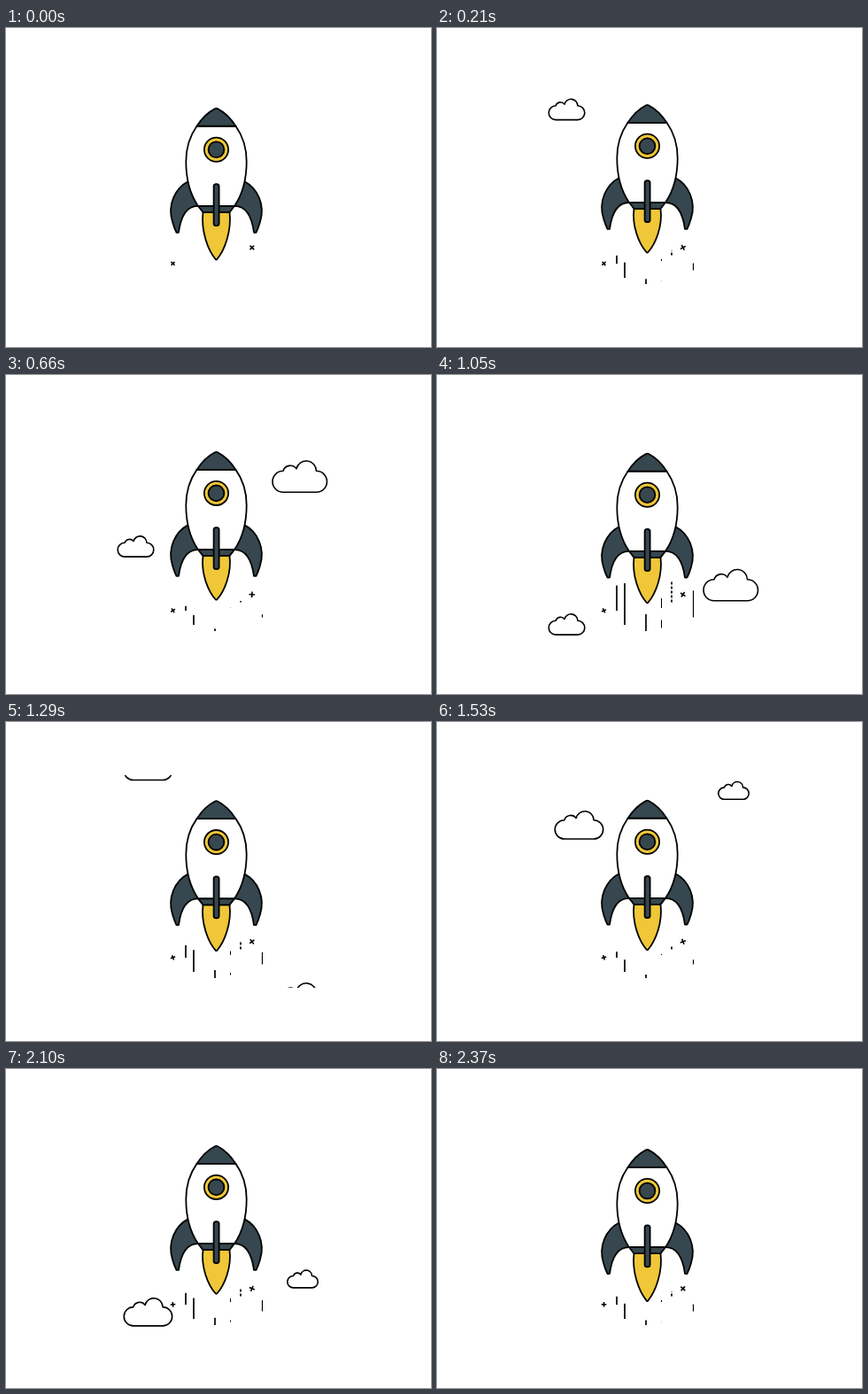
An HTML page with a canvas that plays this animation: 480 px wide and 360 px high, repeating every 2400 ms.

```html
<!DOCTYPE html>
<html lang="en">
<head>
<meta charset="utf-8">
<title>Rocket</title>
<style>
  html, body { margin: 0; width: 100%; height: 100%; overflow: hidden; background: #fff; }
  canvas { display: block; width: 480px; height: 360px; }
</style>
</head>
<body>
<canvas id="stage" width="480" height="360"></canvas>
<script>
const ctx = document.getElementById('stage').getContext('2d');
const LOOP = 2400, STEP = 30, TAU = Math.PI * 2;
const INK = '#000', DARK = '#37474f', YELLOW = '#efc738', WHITE = '#fff';

const fin = new Path2D('M205.5 173.5C191 181 182 200 188 219Q190 226 192.5 231H195Q199 201 217 201.2Z');
const body = new Path2D('M215.5 111C207 123 203.3 137 203.3 151C203.3 170 208 188 217 201.2H258C267 188 271.7 170 271.7 151C271.7 137 268 123 259.5 111Z');
const nose = new Path2D('M215.5 111C221 102.5 228 95.5 236 91.4Q237.5 90.6 239 91.4C247 95.5 254 102.5 259.5 111Z');
const nozzle = new Path2D('M217 201.2H258L252.5 208.2H222.5Z');
const flame = new Path2D('M222.5 0C220 21 228 43 236.8 53.4Q237.5 54.2 238.2 53.4C247 43 255 21 252.5 0Z');
const cloudShape = new Path2D('M12 35.5A12 12 0 0 1 12 11.5A8.5 8.5 0 0 1 27 9A11.4 11.4 0 0 1 49.5 11.5A12 12 0 0 1 49.5 35.5Z');

// base: bottom edge at time "at"; speed in px per ms
const clouds = [
  { x: 126.2, scale: 0.66, base: 151, at: 420, speed: 0.2256 },
  { x: 301, scale: 1, base: 132.3, at: 660, speed: 0.314 },
  { x: 133.2, scale: 0.886, base: 132, at: 1530, speed: 0.277 },
  { x: 317.8, scale: 0.56, base: 87.3, at: 1530, speed: 0.28 }
];

// length = gain * stretch - cut, growing upwards from the bottom
const trails = [
  { x: 203, bottom: 266, gain: 0.65, cut: 2, width: 1.7 },
  { x: 212, bottom: 282, gain: 1, cut: 0, width: 1.7 },
  { x: 236, bottom: 289, gain: 0.45, cut: 2.2, width: 1.7 },
  { x: 253.5, bottom: 263, gain: 0.3, cut: 3, width: 1 },
  { x: 253.5, bottom: 285.5, gain: 0.3, cut: 5, width: 1 },
  { x: 265, bottom: 256.5, gain: 0.6, cut: 5, width: 1.7, dash: [3, 2] },
  { x: 289.5, bottom: 273.5, gain: 0.75, cut: 5, width: 1.2 }
];

function shape(path, fill, width = 1.8) {
  ctx.fillStyle = fill;
  ctx.strokeStyle = INK;
  ctx.lineWidth = width;
  ctx.fill(path);
  ctx.stroke(path);
}

function disc(x, y, r, fill) {
  const path = new Path2D();
  path.arc(x, y, r, 0, TAU);
  shape(path, fill);
}

function line(x1, y1, x2, y2) {
  ctx.beginPath();
  ctx.moveTo(x1, y1);
  ctx.lineTo(x2, y2);
  ctx.stroke();
}

function drawClouds(t) {
  ctx.save();
  ctx.beginPath();
  ctx.rect(0, 60, 480, 240);
  ctx.clip();
  for (const c of clouds) {
    const base = c.base + (t - c.at) * c.speed;
    ctx.save();
    ctx.translate(c.x, base - 35.5 * c.scale);
    ctx.scale(c.scale, c.scale);
    shape(cloudShape, WHITE, 1.6 / c.scale);
    ctx.restore();
  }
  ctx.restore();
}

function drawTrails(t) {
  const wave = 29 + 18 * Math.cos(TAU * (t - 260) / 800);
  const stretch = wave * Math.min(1, t / 550);
  ctx.save();
  ctx.strokeStyle = INK;
  ctx.lineCap = 'butt';
  for (const { x, bottom, gain, cut, width, dash } of trails) {
    const length = gain * stretch - cut;
    if (length <= 0) continue;
    ctx.lineWidth = width;
    ctx.setLineDash(dash || []);
    line(x, bottom, x, bottom - length);
  }
  ctx.restore();
}

function drawSpark(x, y, r, degrees) {
  ctx.save();
  ctx.translate(x, y);
  ctx.rotate(degrees * Math.PI / 180);
  ctx.strokeStyle = INK;
  ctx.lineWidth = 1.6;
  line(-r, 0, r, 0);
  line(0, -r, 0, r);
  ctx.restore();
}

function drawRocket(t) {
  const lift = 2.1 * (1 + Math.cos(TAU * (t - 202) / 480));
  ctx.save();
  ctx.translate(0, -lift);

  ctx.save();
  ctx.translate(0, 208.2);
  ctx.scale(1, 1 - lift / 54);
  shape(flame, YELLOW);
  ctx.restore();

  shape(fin, DARK);
  ctx.save();
  ctx.translate(475, 0);
  ctx.scale(-1, 1);
  shape(fin, DARK);
  ctx.restore();

  shape(body, WHITE);
  shape(nose, DARK);
  shape(nozzle, DARK);
  disc(237.5, 137.5, 13.6, YELLOW);
  disc(237.5, 137.5, 8.9, DARK);

  const rod = new Path2D();
  rod.roundRect(234.6, 176.3, 6, 47, 2.6);
  shape(rod, DARK);
  ctx.restore();
}

function draw(t) {
  ctx.fillStyle = WHITE;
  ctx.fillRect(0, 0, 480, 360);
  ctx.lineJoin = 'round';
  drawClouds(t);
  drawTrails(t);
  drawSpark(188.5, 265.8, 2.8, 45 + t * 0.019);
  drawSpark(277.8, 247.8, 3.3, 45 + t * 0.075);
  drawRocket(t);
}

const start = performance.now();
function tick() {
  const t = (performance.now() - start) % LOOP;
  draw(Math.floor(t / STEP) * STEP);
  requestAnimationFrame(tick);
}
tick();
</script>
</body>
</html>
```
